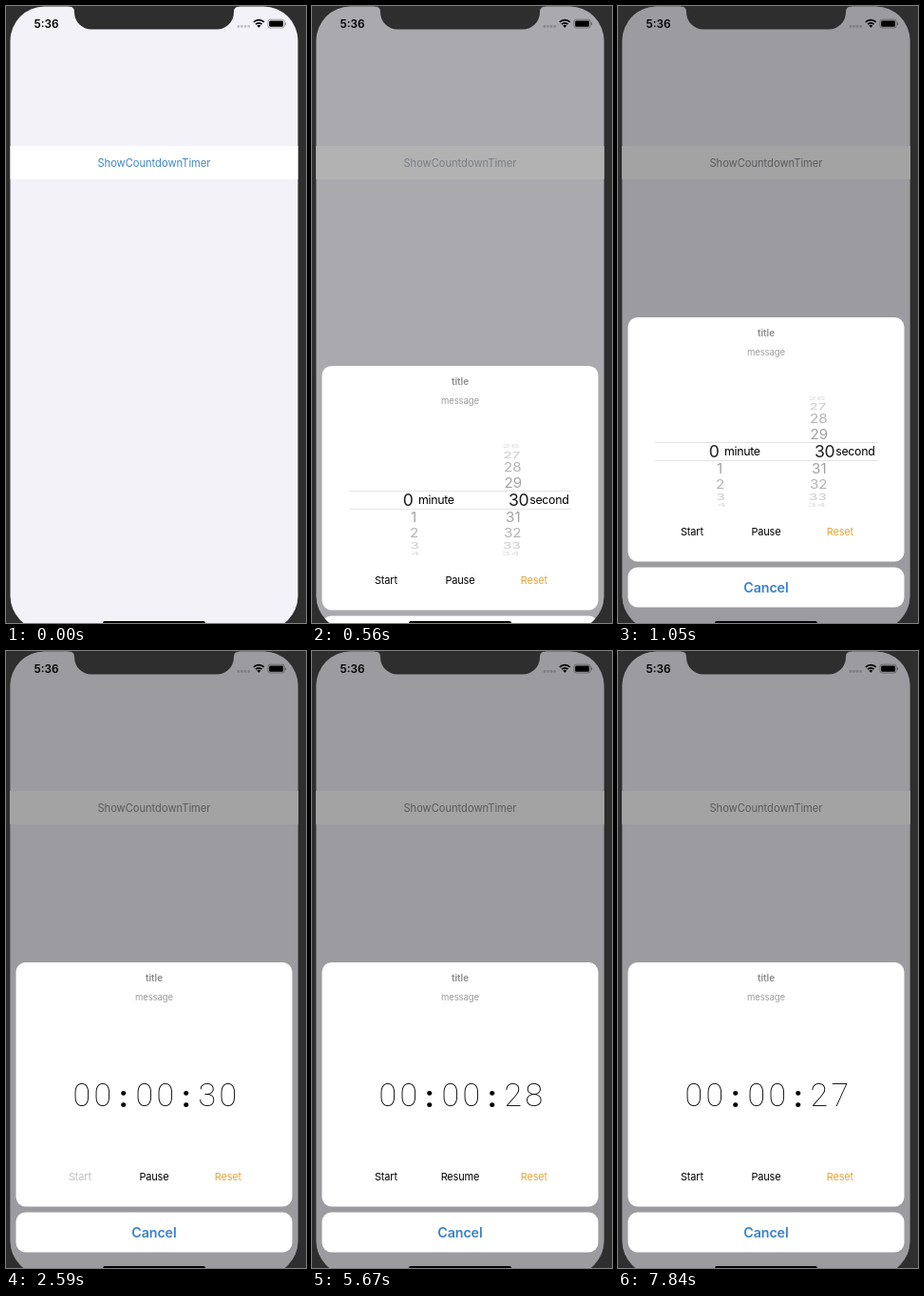
An HTML page with a canvas for the animation above (8 s loop, 316 px wide and 648 px high).

```html
<!DOCTYPE html>
<html lang="en">
<head>
<meta charset="utf-8">
<title>Countdown timer sheet</title>
<style>
html, body { margin: 0; width: 100%; height: 100%; overflow: hidden; background: #2e2e2e; }
canvas { display: block; width: 316px; height: 648px; }
</style>
</head>
<body>
<canvas id="stage"></canvas>
<script>
const W = 316, H = 648, LOOP = 8000, STEP = 70;
const SANS = 'Inter, Roboto, sans-serif';
const canvas = document.getElementById('stage');
const ctx = canvas.getContext('2d');
const ratio = window.devicePixelRatio || 1;
canvas.width = W * ratio;
canvas.height = H * ratio;

const clamp = v => Math.max(0, Math.min(1, v));
const mix = (a, b, p) => a.map((v, i) => v + (b[i] - v) * p);
const rgb = c => `rgb(${c.map(Math.round).join()})`;

function box(x, y, w, h, r, color) {
  ctx.fillStyle = color;
  ctx.beginPath();
  ctx.roundRect(x, y, w, h, r);
  ctx.fill();
}

// Text centred on x, with y at the baseline.
function text(str, x, y, size, color, { weight = 400, spacing = 0, family = SANS } = {}) {
  ctx.font = `${weight} ${size}px ${family}`;
  ctx.letterSpacing = spacing + 'px';
  ctx.textAlign = 'center';
  ctx.fillStyle = color;
  ctx.fillText(str, x + spacing / 2, y);
}

function faded(alpha, draw) {
  ctx.save();
  ctx.globalAlpha *= alpha;
  draw();
  ctx.restore();
}

// Critically damped spring from 0 to 1.
function spring(t, start, rate) {
  const k = Math.max(0, t - start) / 1000 * rate;
  return 1 - (1 + k) * Math.exp(-k);
}

// Opacity of a button label tapped at the given time.
const tapAlpha = (t, start) => t < start ? 1 : 0.25 + 0.75 * clamp((t - start) / 420);

function screenPath() {
  ctx.beginPath();
  ctx.roundRect(4.5, 0.5, 303, 655, 36);
}

function drawPage(t, shown) {
  ctx.fillStyle = '#f3f2f8';
  ctx.fillRect(0, 0, W, H);
  ctx.fillStyle = '#fff';
  ctx.fillRect(0, 147, W, 35);
  const alpha = t < 210 ? 1 : t < 350 ? 0.3 : 0.3 + 0.7 * clamp((t - 350) / 420);
  faded(alpha, () => text('ShowCountdownTimer', 156, 168.5, 11.2,
    rgb(mix([64, 136, 190], [142, 142, 147], shown)), { spacing: -0.05 }));
  ctx.fillStyle = `rgba(0,0,0,${0.36 * shown})`;
  ctx.fillRect(0, 0, W, H);
}

function drawStatus() {
  text('5:36', 42.5, 23, 11.8, '#000', { weight: 600 });
  for (let i = 0; i < 4; i++) box(243.5 + i * 3.6, 20, 2.7, 2.7, 1, 'rgba(0,0,0,.2)');

  ctx.strokeStyle = '#000';
  ctx.lineWidth = 1.7;
  for (const r of [4.6, 7.7]) {
    ctx.beginPath();
    ctx.arc(266.3, 22.4, r, -Math.PI * 0.75, -Math.PI * 0.25);
    ctx.stroke();
  }
  ctx.fillStyle = '#000';
  ctx.beginPath();
  ctx.moveTo(266.3, 22.8);
  ctx.arc(266.3, 22.8, 2.8, -Math.PI * 0.75, -Math.PI * 0.25);
  ctx.fill();

  ctx.strokeStyle = 'rgba(0,0,0,.4)';
  ctx.lineWidth = 0.8;
  ctx.beginPath();
  ctx.roundRect(275.9, 14.2, 17.4, 8.8, 2.4);
  ctx.stroke();
  box(277.2, 15.4, 14.8, 6.4, 1.3, '#000');
  box(294, 17.2, 1.1, 2.8, 0.6, 'rgba(0,0,0,.4)');
}

// One wheel column; rows sit on a cylinder seen from the front.
function drawWheel(x, value, lowest, lean) {
  const radius = 60, turn = 0.305;
  for (let d = -4; d <= 4; d++) {
    if (!d || value + d < lowest) continue;
    const angle = d * turn, depth = Math.cos(angle);
    ctx.save();
    ctx.translate(x - lean * (1 - depth), 468 + radius * Math.sin(angle));
    ctx.scale(1, depth);
    faded(0.12 + 0.34 * depth * depth, () => text(String(value + d), 0, 5.4, 15.2, '#222'));
    ctx.restore();
  }
}

function drawPicker() {
  ctx.fillStyle = '#dcdcde';
  ctx.fillRect(39, 458, 234, 0.8);
  ctx.fillRect(39, 477, 234, 0.8);
  drawWheel(107, 0, 0, -3);
  drawWheel(212, 30, 0, 4);
  text('0', 101.3, 474.3, 17.6, '#1c1c1e');
  text('30', 217.8, 474.3, 17.6, '#1c1c1e', { spacing: -0.6 });
  text('minute', 131, 472.4, 12.4, '#000', { spacing: -0.3 });
  text('second', 250, 472.4, 12.4, '#000', { spacing: -0.3 });
}

function drawClock(seconds) {
  [...`00:00:${seconds}`].forEach((ch, i) => {
    const x = 79.7 + i * 22;
    if (ch === ':') {
      text(ch, x, 478.5, 32, '#000', { weight: 700, family: 'Roboto, sans-serif' });
    } else {
      text(ch, x, 478.3, 34, '#000', { weight: 100, family: 'Roboto, sans-serif' });
    }
  });
}

function drawSheet(t, shown) {
  ctx.save();
  ctx.translate(0, 321 * (1 - shown));
  box(10.5, 327, 291, 256.5, 10, '#fff');
  box(10.5, 589.5, 291, 42, 10, '#fff');
  text('title', 156, 346.6, 10, '#8c8c8c', { weight: 600 });
  text('message', 156, 367, 9.6, '#9c9c9c', { spacing: -0.15 });

  if (t < 2590) drawPicker();
  else drawClock(30 - (t >= 3640) - (t >= 4690) - (t >= 7840));

  const resumable = t >= 5320 && t < 6860;
  const label = { spacing: -0.2 };
  faded(tapAlpha(t, 2590), () => text('Start', 78, 556.3, 11, '#000', label));
  faded(tapAlpha(t, t < 6790 ? 5250 : 6790), () =>
    text(resumable ? 'Resume' : 'Pause', 156, 556.3, 11, '#000', label));
  text('Reset', 234, 556.3, 11, '#e3a53c', label);
  text('Cancel', 156, 615.5, 14.3, '#3a82c8', { weight: 600, spacing: -0.15 });
  ctx.restore();
}

function drawNotch() {
  ctx.fillStyle = '#2e2e2e';
  ctx.beginPath();
  ctx.moveTo(66, 0);
  ctx.lineTo(66, 0.5);
  ctx.quadraticCurveTo(72, 0.5, 72, 6);
  ctx.arcTo(72, 24.5, 92, 24.5, 18);
  ctx.arcTo(240, 24.5, 240, 6, 18);
  ctx.lineTo(240, 6);
  ctx.quadraticCurveTo(240, 0.5, 246, 0.5);
  ctx.lineTo(246, 0);
  ctx.fill();
}

function draw(time) {
  const t = Math.floor(time % LOOP / STEP) * STEP;
  const shown = t >= 910 ? 1 : spring(t, 410, 22);
  ctx.setTransform(ratio, 0, 0, ratio, 0, 0);
  ctx.fillStyle = '#2e2e2e';
  ctx.fillRect(0, 0, W, H);
  ctx.save();
  screenPath();
  ctx.clip();
  drawPage(t, shown);
  drawStatus();
  drawSheet(t, shown);
  ctx.restore();
  drawNotch();
  box(102, 646, 108, 4, 2, '#000');
}

const begin = performance.now();
function tick() {
  draw(performance.now() - begin);
  requestAnimationFrame(tick);
}
tick();
</script>
</body>
</html>
```
